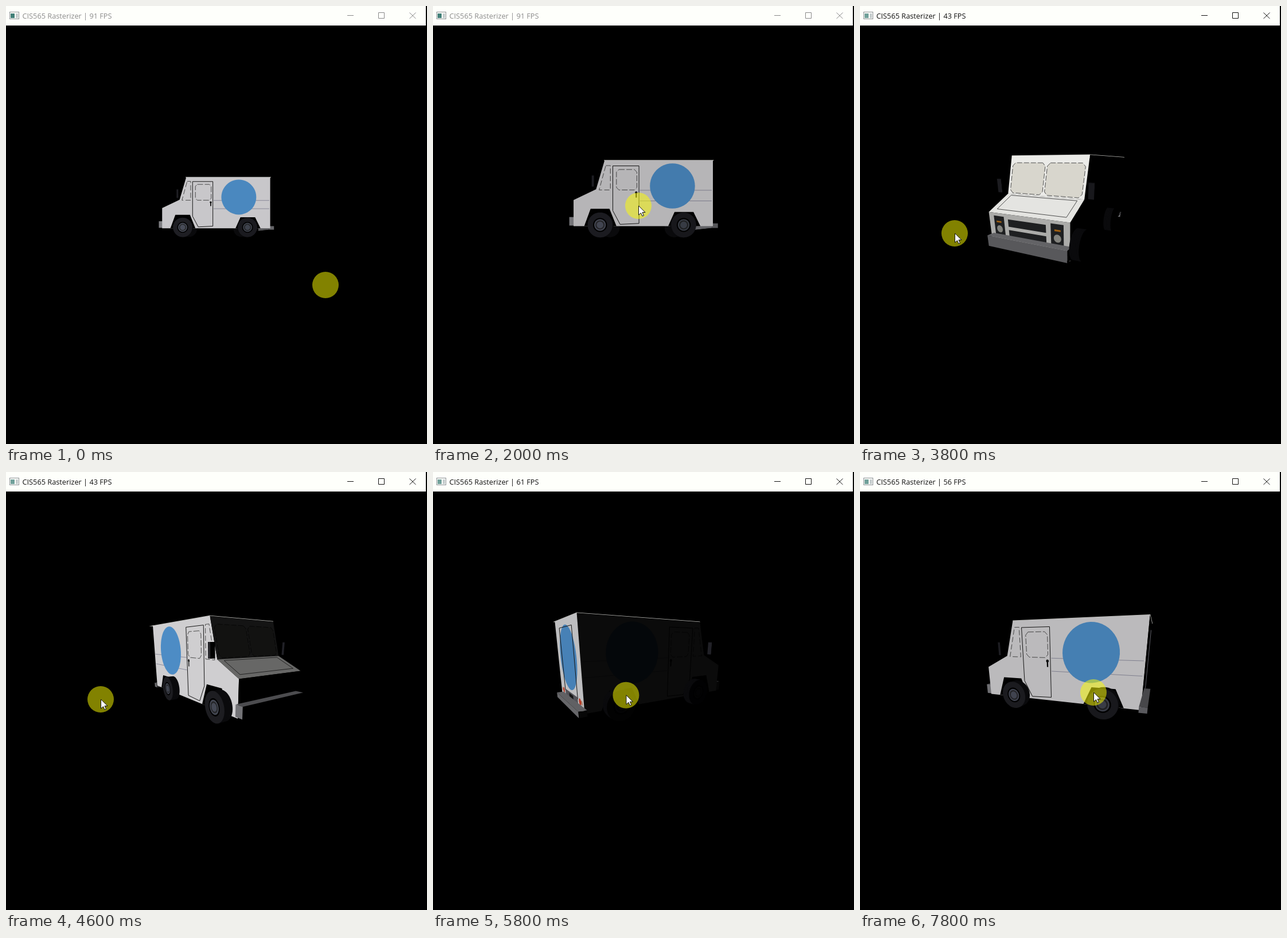
An HTML page with a canvas for the animation above (8000 ms loop, 734 px wide and 763 px high).

```html
<!DOCTYPE html>
<html lang="en">
<head>
<meta charset="utf-8">
<title>Rasterizer</title>
<style>
  html, body { margin: 0; width: 100%; height: 100%; overflow: hidden; background: #000; }
  canvas { position: absolute; left: 0; top: 0; }
  #title {
    position: absolute; left: 28.5px; top: 8px; white-space: pre;
    font: 12.75px/18px "Open Sans", "Noto Sans", sans-serif;
  }
</style>
</head>
<body>
<canvas id="stage" width="734" height="763"></canvas>
<div id="title"></div>
<script>
const ctx = document.getElementById('stage').getContext('2d');
const title = document.getElementById('title');
const LOOP = 8000, STEP = 200, FPS_PERIOD = 1200;
const FOCAL = 366, CENTER_X = 366, CENTER_Y = 400;
const HALF = 1.1, FRONT = -2.28, REAR = 2.3, ROOF = 2.47, FLOOR = 0.31;
const ROOF_FRONT = -1.26, HOOD_BACK = -1.54, HOOD_TOP = 1.52, HOOD_LOW = 1.17;
const LIGHT = [-6, 4, 0];
const FPS = [91, 91, 59, 43, 61, 50, 56];

const WHITE = [243, 242, 245], SNOW = [270, 270, 267], BLUE = [90, 165, 232], BLACK = [0, 0, 0];
const INK = [25, 25, 25], GREY = [90, 90, 90], STRIPE = [165, 165, 185], GRILLE = [48, 49, 52];
const CREAM = [248, 246, 236], STEEL = [145, 145, 150], TYRE = [36, 36, 42], HUB = [86, 91, 106];

const ramp = (t, from, to) => Math.min(1, Math.max(0, (t - from) / (to - from)));
const dot = (a, b) => a[0] * b[0] + a[1] * b[1] + a[2] * b[2];
const sub = (a, b) => a.map((v, i) => v - b[i]);
const rgb = (color, k) => `rgb(${color.map(v => Math.min(255, Math.round(v * k)))})`;
const rect = (x0, y0, x1, y1) => [[x0, y0], [x1, y0], [x1, y1], [x0, y1]];
const ring = (x, y, r) => Array.from({ length: 48 }, (_, i) =>
  [x + r * Math.cos(i * Math.PI / 24), y + r * Math.sin(i * Math.PI / 24)]);

// Rectangle with its corners cut off
function chamfer(x0, y0, x1, y1, cut) {
  const dx = cut * Math.sign(x1 - x0), dy = cut * Math.sign(y1 - y0);
  return [[x0 + dx, y0], [x1 - dx, y0], [x1, y0 + dy], [x1, y1 - dy],
    [x1 - dx, y1], [x0 + dx, y1], [x0, y1 - dy], [x0, y0 + dy]];
}

// Zoom in, grab the truck, then spin it with a slowing turn and a fading nod.
function poseAt(t) {
  const distance = 10 - 2 * ramp(t, 400, 1600) - ramp(t, 2000, 2400);
  const grab = ramp(t, 2400, 3000), swing = ramp(t, 3000, 3800);
  const u = Math.max(0, t - 3800) / 1000;
  const yaw = -.82 * grab - 4.34 * swing + 1.395 * u - .05 * u * u;
  const nod = .278 + .062 * Math.exp(-.6 * u) * Math.cos(2.2 * u);
  return { distance, yaw, pitch: .21 * grab + (nod - .21) * swing };
}

let toEye;
function setPose({ distance, yaw, pitch }) {
  const cy = Math.cos(yaw), sy = Math.sin(yaw), cp = Math.cos(pitch), sp = Math.sin(pitch);
  toEye = ([x, y, z]) => {
    const depth = z * cy - x * sy;
    return [x * cy + z * sy, y * cp - depth * sp, y * sp + depth * cp - distance];
  };
  return { x: -distance * cp * sy, z: distance * cp * cy };
}

function trace(points, closed = true) {
  ctx.beginPath();
  for (const p of points) {
    const [x, y, z] = toEye(p);
    ctx.lineTo(CENTER_X - FOCAL * x / z, CENTER_Y + FOCAL * y / z);
  }
  if (closed) ctx.closePath();
}

// Draws a lit flat face if it looks at the camera, then its markings.
function face(normal, map, outline, color, decorate) {
  const points = outline.map(map);
  const center = [0, 1, 2].map(i => points.reduce((sum, p) => sum + p[i], 0) / points.length);
  const eye = toEye(center);
  const n = sub(toEye(center.map((v, i) => v + normal[i])), eye);
  if (dot(n, eye) >= 0) return;
  const ray = sub(LIGHT, eye);
  const shade = Math.max(0, dot(n, ray) / Math.hypot(...ray) / Math.hypot(...n));
  const fill = (pts, c) => {
    trace(pts.map(map));
    ctx.fillStyle = rgb(c, shade);
    ctx.fill();
  };
  const line = (pts, c = INK, dash = [], closed = true) => {
    trace(pts.map(map), closed);
    ctx.setLineDash(dash);
    ctx.lineWidth = 1;
    ctx.strokeStyle = rgb(c, shade);
    ctx.stroke();
    ctx.setLineDash([]);
  };
  fill(outline, color);
  if (decorate) decorate(fill, line, shade);
}

function box(low, high, color) {
  for (let axis = 0; axis < 3; axis++) {
    const u = (axis + 1) % 3, v = (axis + 2) % 3;
    for (const sign of [-1, 1]) {
      const normal = [0, 0, 0];
      normal[axis] = sign;
      const map = ([a, b]) => {
        const p = [];
        p[axis] = sign < 0 ? low[axis] : high[axis];
        p[u] = a;
        p[v] = b;
        return p;
      };
      face(normal, map, rect(low[u], low[v], high[u], high[v]), color);
    }
  }
}

function wheels(side) {
  for (const x of [-1.41, 1.34]) {
    for (let z = .85; z < HALF; z += .05) {
      trace(ring(x, .35, .41).map(([a, b]) => [a, b, z * side]));
      ctx.fillStyle = '#0a0a0c';
      ctx.fill();
    }
    face([0, 0, side], ([a, b]) => [a, b, HALF * side], ring(x, .35, .41), TYRE, fill => {
      [BLACK, HUB, GRILLE, HUB].forEach((c, i) => fill(ring(x, .35, .23 - .04 * i), c));
    });
  }
}

function sidePanel(side) {
  const outline = [[ROOF_FRONT, ROOF], [REAR, ROOF], [REAR, FLOOR], [FRONT, FLOOR],
    [FRONT, HOOD_LOW], [HOOD_BACK, HOOD_TOP]];
  const arch = (x, top) => [[x - .53, FLOOR], [x - .32, top], [x + .3, top], [x + .53, FLOOR]];
  face([0, 0, side], ([x, y]) => [x, y, HALF * side], outline, WHITE, (fill, line) => {
    for (const y of [1.49, 1.14]) line([[-.1, y], [2.26, y]], STRIPE, [], false);
    fill(ring(.97, 1.63, .74), BLUE);
    line([[-1.22, 2.3], [-1.07, 2.3], [-1.07, 1.5], [-1.44, 1.5]], GREY, [9, 4]);
    line([[-.99, 2.29], [-.13, 2.29], [-.13, .4], [-.75, .37], [-.99, .82]]);
    line(chamfer(-.87, 2.17, -.2, 1.5, .08), GREY, [10, 3]);
    fill(ring(-.22, 1.41, .04), BLACK);
    fill(rect(-.24, 1.41, -.2, 1.25), BLACK);
    fill(arch(-1.4, .88), BLACK);
    fill(arch(1.36, .78), BLACK);
  });
}

function rearPanel() {
  face([1, 0, 0], ([z, y]) => [REAR, y, z], rect(-HALF, ROOF, HALF, FLOOR), WHITE, (fill, line, shade) => {
    fill(ring(0, 1.5, .82), BLUE);
    line(rect(-.62, 2.27, .62, .56));
    fill(rect(-.62, .6, .62, .38), [105, 105, 112]);
    fill(rect(-.2, .55, .2, .44), INK);
    for (const side of [-1, 1]) {
      fill(ring(side * .94, .53, .06), [220, 150, 120]);
      fill(ring(side * .8, .53, .085), [235, 65, 40]);
    }
    if (shade > .05) return;
    trace([[REAR, 2.25, -.75], [REAR, .56, -.75], [REAR, .5, .2]], false);
    ctx.strokeStyle = '#5e5e66';
    ctx.stroke();
  });
}

function nose() {
  const slope = (x0, y0, x1, y1) => ([z, v]) => [x0 + (x1 - x0) * v, y0 + (y1 - y0) * v, z];
  const whole = rect(-HALF, 0, HALF, 1);
  face([-.96, .28, 0], slope(ROOF_FRONT, ROOF, HOOD_BACK, HOOD_TOP), whole, SNOW, (fill, line) => {
    for (const side of [-1, 1]) {
      const pane = chamfer(side * .03, .18, side * 1.03, .97, .08);
      fill(pane, CREAM);
      line(pane, GREY, [9, 3]);
    }
  });
  face([-.43, .9, 0], slope(HOOD_BACK, HOOD_TOP, FRONT, HOOD_LOW), whole, SNOW,
    (fill, line) => line(rect(-.95, .08, .95, .82), GREY));
  face([-1, 0, 0], ([z, y]) => [FRONT, y, z], rect(-HALF, HOOD_LOW, HALF, FLOOR), SNOW, fill => {
    for (const y of [.96, .7]) fill(rect(-.52, y + .09, .52, y - .09), GRILLE);
    for (const side of [-1, 1]) {
      fill(rect(side * .64, 1.1, side * .95, .64), GRILLE);
      fill(rect(side * .73, .98, side * .88, .94), [250, 150, 30]);
      fill(ring(side * .8, .78, .09), [205, 205, 198]);
    }
  });
}

function truck(camera) {
  // Each part outside the body: is it in front of the body, and how to draw it
  const extras = [
    [camera.x < FRONT, () => box([-2.42, .33, -HALF], [-2.2, .61, HALF], STEEL)],
    [camera.x > REAR, () => box([2.25, .25, -1.14], [2.45, .4, 1.14], STEEL)]
  ];
  for (const side of [-1, 1]) {
    const z = 1.29 * side;
    extras.push(
      [side * camera.z > HALF, () => wheels(side)],
      [camera.x < FRONT, () => box([-1.62, 1.55, z - .07], [-1.55, 1.9, z + .07], TYRE)]
    );
  }
  const drawExtras = inFront => extras.forEach(([front, draw]) => front === inFront && draw());

  drawExtras(false);
  trace(rect(ROOF_FRONT, -HALF, REAR, HALF).map(([x, z]) => [x, ROOF, z]));
  ctx.lineWidth = 1.5;
  ctx.strokeStyle = '#b8b8b4';
  ctx.stroke();
  sidePanel(-1);
  sidePanel(1);
  rearPanel();
  nose();
  drawExtras(true);
}

function titleBar(t) {
  const focused = t >= 2600;
  ctx.fillStyle = '#fefffb';
  ctx.fillRect(0, 0, 732, 34);
  ctx.lineWidth = 1;
  ctx.strokeStyle = '#8b9295';
  ctx.strokeRect(6.5, 10.5, 16, 12);
  ctx.fillStyle = focused ? '#70a09a' : '#417f78';
  ctx.fillRect(8, 13, 7, 8);
  ctx.fillStyle = '#c5cccd';
  ctx.fillRect(17, 13, 4, 8);
  ctx.strokeStyle = focused ? '#111' : '#888';
  ctx.beginPath();
  ctx.moveTo(595, 16.5); ctx.lineTo(606, 16.5);
  ctx.rect(649.5, 11.5, 10, 10);
  ctx.moveTo(703.5, 11.5); ctx.lineTo(714.5, 22);
  ctx.moveTo(714.5, 11.5); ctx.lineTo(703.5, 22);
  ctx.stroke();
  title.textContent = `CIS565 Rasterizer | ${FPS[Math.floor(t / FPS_PERIOD)]} FPS`;
  title.style.color = focused ? '#111' : '#8c8c8c';
}

// The hand glides to the truck, drags left, rests, then drags back right.
function pointerAt(t) {
  const arrive = ramp(t, 200, 2000), grab = ramp(t, 2000, 3000), left = ramp(t, 3000, 3800);
  const back = ramp(t, 4800, 5200), right = ramp(t, 5200, 6600), end = ramp(t, 6600, 7800);
  return [
    557 - 199 * arrive - 30 * grab - 163 * left + 141 * back + 71 * right + 30 * end,
    486 - 138 * arrive + 42 * grab + 6 * left - 17 * right + 5 * end
  ];
}

function pointer(t) {
  const [x, y] = pointerAt(t);
  ctx.fillStyle = 'rgba(255, 255, 0, .51)';
  ctx.beginPath();
  ctx.arc(x, y, 23, 0, 2 * Math.PI);
  ctx.fill();
  if (t === 0) return;
  ctx.beginPath();
  for (const [dx, dy] of [[0, 0], [0, 16], [4, 12.5], [6.5, 18], [9, 17], [6.5, 11.5], [11.5, 11.5]])
    ctx.lineTo(x + .5 + dx, y + dy);
  ctx.closePath();
  ctx.fillStyle = '#fff';
  ctx.strokeStyle = '#111';
  ctx.lineWidth = 1;
  ctx.fill();
  ctx.stroke();
}

const start = performance.now();
function draw() {
  const elapsed = (performance.now() - start) % LOOP;
  const t = Math.floor(elapsed / STEP) * STEP;
  ctx.fillStyle = '#000';
  ctx.fillRect(0, 0, 734, 763);
  truck(setPose(poseAt(t)));
  titleBar(t);
  pointer(t);
  requestAnimationFrame(draw);
}
draw();
</script>
</body>
</html>
```
